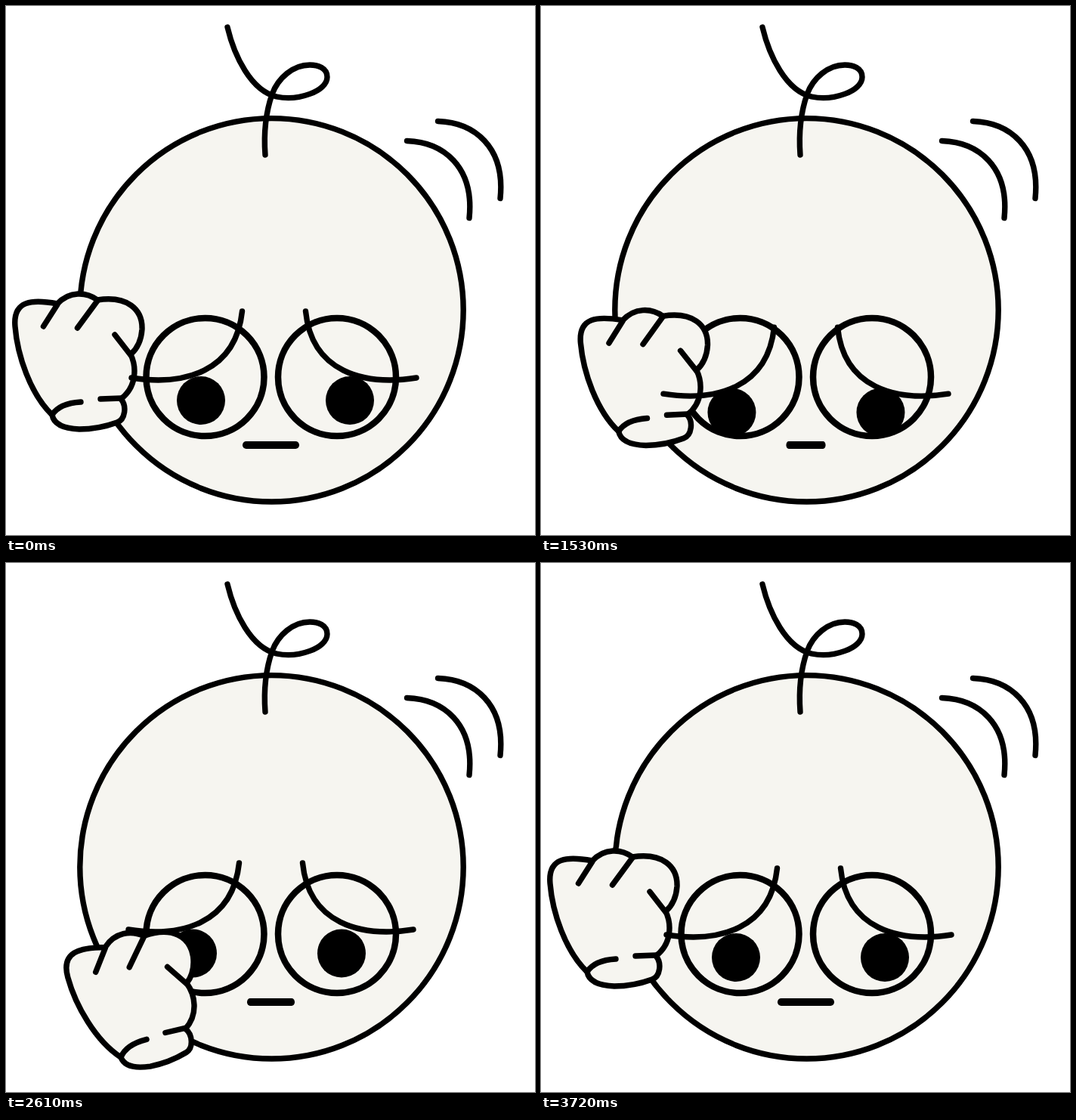
Recreate the animation shown at these times as an HTML page. Size 700x700 px, loop 4920 ms.

```html
<!DOCTYPE html>
<html lang="en">
<head>
<meta charset="utf-8">
<title>Rubbing an eye</title>
<style>
  html, body { margin: 0; width: 100%; height: 100%; overflow: hidden; background: #fff; }
  svg { display: block; width: 100%; height: 100%; }
  .line { fill: none; stroke: #000; stroke-width: 7.4; stroke-linecap: round; stroke-linejoin: round; }
  .eyes { stroke-width: 8.5; }
  .skin { fill: #f6f5f0; }
</style>
</head>
<body>
<svg viewBox="0 0 700 700">
  <g class="line">
    <circle class="skin" cx="351.5" cy="402.3" r="253.7"/>
    <path d="M293 28C302 66 324 112 358 120C386 126 425 113 425 94C425 82 413 78 402 78C380 78 360 95 352 117C343 143 341 170 343 197"/>
    <path id="swoosh" d="M530.5 178.5C578 180 620 212 613 280.5"/>
    <use href="#swoosh" x="41" y="-26"/>
    <g class="eyes">
      <circle cx="263.5" cy="491" r="78"/>
      <circle cx="438" cy="491" r="78"/>
    </g>
  </g>
  <g id="pupils">
    <circle cx="258" cy="522" r="32"/>
    <circle cx="455" cy="522" r="32"/>
  </g>
  <rect id="mouth" x="-37.5" y="-5" width="75" height="10" rx="4.8"/>
  <g id="hand" class="line">
    <path class="skin" d="M61 541C32 513 15 462 12 424C9 389 35 388 68 394C84 377 106 378 121 389C160 383 181 401 180 428C179 442 173 454 165 461C173 478 173 504 152 520C160 529 158 547 147 551C128 558 112 560 97 560C73 559 63 552 61 541Z"/>
    <path d="M68 395L49.5 424M121 390L94.5 426M144 435L165 462M125 520L152 519M61 541C68 530 82 525 99 524"/>
  </g>
  <g id="brows" class="line">
    <path d="M166 492C236 503 304 484 312.5 404"/>
    <path d="M396.5 404C404.5 484 473 503 543 492"/>
  </g>
</svg>
<script>
  const LOOP = 4920, STEP = 30;
  const HAND = [95, 478]; // pivot of the hand

  // Offsets from the drawn pose
  const rest = { hand: [0, 0], turn: 0, brows: [0, 0], pupils: [0, 0], mouth: 1 };
  const rub = { hand: [36, 10], turn: 0, brows: [-4, 24], pupils: [-5, 18], mouth: 0.68 };
  const low = { hand: [89, 132], turn: -21.7, brows: [-4, -38], pupils: [-17, -29], mouth: 1 };

  const smooth = p => p * p * (3 - 2 * p);
  const soft = p => 0.25 * p + 0.75 * smooth(p);

  // cubic-bezier(.25, .1, .25, 1)
  function ease(p) {
    let a = 0, b = 1;
    for (let i = 0; i < 24; i++) {
      const u = (a + b) / 2;
      if (0.75 * u * (1 - u) + u ** 3 < p) a = u; else b = u;
    }
    return 0.3 * a * (1 - a) ** 2 + 3 * a * a * (1 - a) + a ** 3;
  }
  const easeBack = p => 1 - ease(1 - p);

  const moves = [
    { start: 360, end: 690, from: rest, to: rub, reach: soft },
    { start: 1500, end: 1800, from: rub, to: low, reach: ease },
    { start: 2460, end: 2760, from: low, to: rub, reach: easeBack },
    { start: 3330, end: 3720, from: rub, to: rest, reach: soft }
  ];

  const mix = (a, b, k) => a + (b - a) * k;
  const mixPoint = (a, b, k) => [mix(a[0], b[0], k), mix(a[1], b[1], k)];
  const place = (id, transform) =>
    document.getElementById(id).setAttribute("transform", transform);

  function draw(now) {
    const t = Math.floor((now % LOOP) / STEP) * STEP;
    const { start, end, from, to, reach } = moves.findLast(m => t >= m.start) || moves[0];
    const p = Math.min(1, Math.max(0, (t - start) / (end - start)));
    const k = soft(p);
    const hand = mixPoint(from.hand, to.hand, reach(p));
    const turn = mix(from.turn, to.turn, smooth(p));

    place("hand", `translate(${hand}) rotate(${turn} ${HAND})`);
    place("brows", `translate(${mixPoint(from.brows, to.brows, k)})`);
    place("pupils", `translate(${mixPoint(from.pupils, to.pupils, k)})`);
    place("mouth", `translate(350.5 581) scale(${mix(from.mouth, to.mouth, k)} 1)`);
  }

  const origin = performance.now();
  function tick() {
    draw(performance.now() - origin);
    requestAnimationFrame(tick);
  }
  tick();
</script>
</body>
</html>
```
